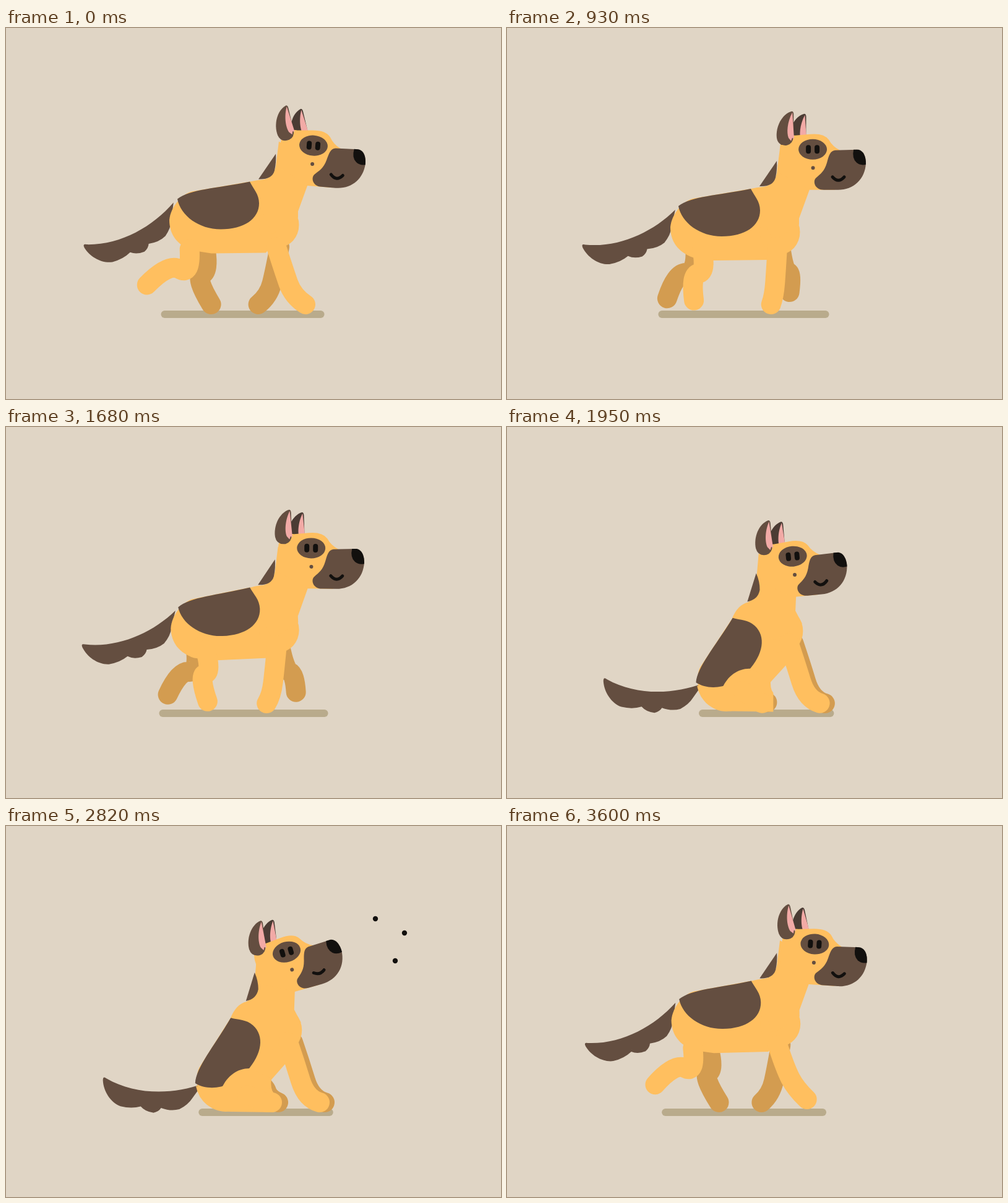
Recreate the animation shown at these times as an HTML page with a canvas. Size 800 px wide and 600 px high, loop 3630 ms.

```html
<!DOCTYPE html>
<html lang="en">
<head>
<meta charset="utf-8">
<title>Dog: trot, sit, sniff</title>
<style>
html, body { margin: 0; width: 100%; height: 100%; overflow: hidden; background: #e0d5c5; }
canvas { display: block; }
</style>
</head>
<body>
<canvas id="stage" width="800" height="600"></canvas>
<script>
const ctx = document.getElementById('stage').getContext('2d');
const LOOP = 3630, STEP = 720;
const BG = '#e0d5c5', COAT = '#ffbf5f', FAR = '#d39c50', BROWN = '#644e40',
      DARK = '#4b3c34', BLACK = '#12100e', PINK = '#f2aaa6', SHADOW = '#b9ab8c';

const { sin, cos, max, min, PI } = Math;
const lerp = (a, b, k) => a + (b - a) * k;
const clamp = v => min(1, max(0, v));
const ramp = (t, from, to) => {
  const v = clamp((t - from) / (to - from));
  return v * v * (3 - 2 * v);
};
const bump = (t, a, b, c, d) => ramp(t, a, b) - ramp(t, c, d);
const wave = (t, period, peak) => cos(2 * PI * (t - peak) / period);

function fill(d, color) {
  ctx.fillStyle = color;
  ctx.fill(new Path2D(d));
}

function stroke(d, color, width) {
  ctx.strokeStyle = color;
  ctx.lineWidth = width;
  ctx.lineCap = ctx.lineJoin = 'round';
  ctx.stroke(new Path2D(d));
}

function oval(x, y, rx, ry, color) {
  ctx.fillStyle = color;
  ctx.beginPath();
  ctx.ellipse(x, y, rx, ry, 0, 0, 2 * PI);
  ctx.fill();
}

function pill(x, y, w, h, color) {
  ctx.fillStyle = color;
  ctx.beginPath();
  ctx.roundRect(x - w / 2, y - h / 2, w, h, min(w, h) / 2);
  ctx.fill();
}

function turn(x, y, deg) {
  ctx.translate(x, y);
  ctx.rotate(deg * PI / 180);
  ctx.translate(-x, -y);
}

function group(draw) {
  ctx.save();
  draw();
  ctx.restore();
}

// Blends two outlines that share the same commands.
function blend(a, b, k) {
  const to = b.match(/[\d.]+/g);
  let i = 0;
  return a.replace(/[\d.]+/g, n => lerp(+n, +to[i++], k).toFixed(2));
}

// Hip, knee, hock, foot; knee and hock are offset from the hip-foot line.
function limb(hip, foot, knee, hock) {
  const along = (k, off) => hip.map((v, i) => lerp(v, foot[i], k) + off[i]);
  return [hip, along(.4, knee), along(.76, hock), foot];
}

function frontLeg(a) {
  const lift = max(0, -sin(a)), c = cos(a);
  return limb([437, 354], [443.5 + 41 * cos(a + .15), 447 - 20 * lift],
    [-7 * c, 10 * lift], [8 * lift - 9 * c, 9 - 22 * lift]);
}

function hindLeg(a) {
  const c = cos(a), lift = ((1 + cos(a - .17)) / 2) ** 2;
  const x = 275 - 52 * c + 8 * sin(a) - 19 * sin(2 * a) + 5 * cos(2 * a);
  return limb([311 + (x - 285) / 4, 358], [x, 447 - 32 * lift],
    [16 + 14 * c, 20 * lift], [21 * c - 3, -22]);
}

function leg(walking, sitting, k, color) {
  const [p, q, r, s] = walking.map((v, i) => v.map((n, j) => lerp(n, sitting[i][j], k)));
  const mid = q.map((v, i) => (v + r[i]) / 2);
  stroke(`M${p} Q${q} ${mid} Q${r} ${s}`, color, 32);
}

const shift = (points, dx) => points.map(([x, y]) => [x + dx, y]);
const SIT_FRONT = [[456, 350], [467, 382], [485, 441], [507, 447]];
const SIT_HIND = [[390, 435], [405, 440], [415, 447], [430, 447]];
const SIT_FAR_HIND = [[405, 415], [418, 420], [425, 440], [440, 447]];

function drawTail(k, bob, t) {
  ctx.translate(38 * k, 120 * k);
  turn(268, 308, lerp(2.4 * bob - 2.8, 29 + 7.3 * wave(t, 880, 2490), k));
  fill('M272,294 C235,330 180,355 126,349 Q119,347 122,354 C130,370 148,382 165,381 ' +
    'Q183,378 195,368 Q205,373 218,369 Q225,364 226,357 Q243,356 254,347 Q264,335 266,322Z', BROWN);
}

// The torso stays rigid and tips up around the rump; the neck follows.
function drawBody(k) {
  const tip = () => {
    ctx.translate(26 * k, 128 * k);
    turn(277, 288, -48 * k);
  };
  group(() => {
    tip();
    fill('M394,260 L300,276 C285,280 266,300 264,322 C264,345 276,362 300,371 L332,376 L420,375 L440,350 L440,290Z', COAT);
  });
  oval(441 + 2 * k, 330, 32.5, 36, COAT);
  fill(blend('M441,195 L436,235 Q431,256 412,257 Q403,258 394,260 L430,345 L472,318 L472,308 L488,264 L500,230Z',
    'M403,205 L400,240 Q406,272 386,284 Q369,288 360,311 L430,345 L474,318 L463,297 L464,268 L480,230Z', k), COAT);
  fill(blend('M436,215 L408,256 Q430,257 434,242 Q437,228 436,215Z',
    'M399,237 L385,283 Q402,280 405,264 Q405,250 399,237Z', k), BROWN);
  group(() => {
    tip();
    fill('M277,288 C297,272 340,271 394,260 C400,272 409,280 409,295 C409,320 385,337 347,337 C312,337 282,315 277,288Z', BROWN);
  });
  group(() => {
    ctx.translate(lerp(305, 365, k), lerp(340, 440, k));
    ctx.scale(k, k);
    ctx.translate(-365, -440);
    fill('M346,424 C355,403 373,391 393,392 L426,408 Q424,425 430,432 L430,463 L360,462 Q312,460 304,420 Q325,428 346,424Z', COAT);
  });
}

function drawEar(color) {
  fill('M461,135 C445,139 434,160 436,178 Q438,191 452,190 Q462,188 463,176 L464,140 Q464,135 461,135Z', color);
  fill('M462,137 C453,153 452,170 455,178 L459,183 L461,178 L464,180Z', PINK);
}

function drawHead({ x, y, tilt, ear, smile, open }) {
  ctx.translate(x - 494, y - 196);
  turn(494, 196, tilt);
  group(() => {
    turn(475, 176, ear);
    ctx.translate(20, 4);
    drawEar(DARK);
  });
  fill('M441,200 C440,180 450,173 466,174 L490,172 Q512,170 520,181 Q526,192 538,198 L530,262 L489,262 L440,235Z', COAT);
  group(() => {
    turn(454, 184, ear);
    drawEar(BROWN);
  });
  oval(494, 196.5, 23, 16.5, BROWN);
  for (const side of [-7, 7]) pill(494 + side, 196.5, 8, 14 * open, BLACK);
  oval(494.5, 226.5, 3, 3, BROWN);
  fill('M530,198 L566,197 Q580,202 580,218 C579,245 560,262 535,262 L512,262 ' +
    'C497,262 494,248 499,243 C507,236 513,232 517,218 C520,207 522,199 530,198Z', BROWN);
  fill('M560,197 L568,197 Q580,200 580,221 Q571,223 565,218 Q557,211 560,197Z', BLACK);
  const w = 7.5 + 2 * smile;
  stroke(`M${535.5 - w},241 Q535.5,${241 + 11 * smile} ${535.5 + w},241`, BLACK, 5);
}

function draw(t) {
  const rise = clamp((t - 3250) / 380), up = 1 - ramp(t, 3250, LOOP);
  const k = ramp(t, 1640, 1980) * up;
  const kHind = ramp(t, 1640, 2030) * up;
  const walk = t > 2600 ? t - LOOP : t;
  const a = 2 * PI * walk / STEP;
  const bob = wave(walk, STEP / 2, 190);
  const settle = 1 - ramp(t, 1950, 2200);
  const sniff = bump(t, 2200, 2430, 2650, 2950);
  const lunge = 26 * sin(PI * rise) ** 2;
  const lean = 3 * settle + 7 * sniff;
  const dx = lean * k + lunge / 2;
  const dy = (6 * bob - 5.6) * (1 - k);

  ctx.fillStyle = BG;
  ctx.fillRect(0, 0, 800, 600);
  pill(lerp(382.5, 420, k), 463,
    2 * lerp(134.8 + 3.3 * wave(walk, STEP / 2, 215), 110 - lean * .45, k), 12, SHADOW);

  group(() => {
    ctx.translate(dx, dy);
    drawTail(k, bob, t);
  });
  leg(hindLeg(a + PI), SIT_FAR_HIND, kHind, FAR);
  leg(shift(frontLeg(a + 2.92), 5), shift(SIT_FRONT, 8), k, FAR);
  group(() => {
    ctx.translate(dx, dy);
    drawBody(k);
  });
  leg(hindLeg(a), SIT_HIND, kHind, COAT);
  leg(frontLeg(a), SIT_FRONT, k, COAT);

  group(() => drawHead({
    x: lerp(495.5 - 1.5 * bob, 453 + 8 * settle + sniff, k) + lunge,
    y: lerp(192.8 + 3.2 * bob, 206 + 3 * settle - 7 * sniff, k),
    tilt: lerp(2.2 - 2.3 * bob, 5.5 * settle - 11 - 12.5 * sniff, k),
    ear: lerp(9.5 * bob - 10, 4 - 5 * settle + 9 * sniff, k),
    smile: 1 - sniff,
    open: 1 - .7 * bump(t, 3000, 3080, 3170, 3250)
  }));

  [[597, 150], [644, 173], [629, 218]].forEach(([x, y], i) => {
    const late = 40 * i, r = 4.2 * bump(t, 2230 + late, 2340 + late, 3170, 3235);
    if (r > 0) oval(x, y, r, r, BLACK);
  });
}

const start = performance.now();
function tick() {
  draw((performance.now() - start) % LOOP);
  requestAnimationFrame(tick);
}
tick();
</script>
</body>
</html>
```
